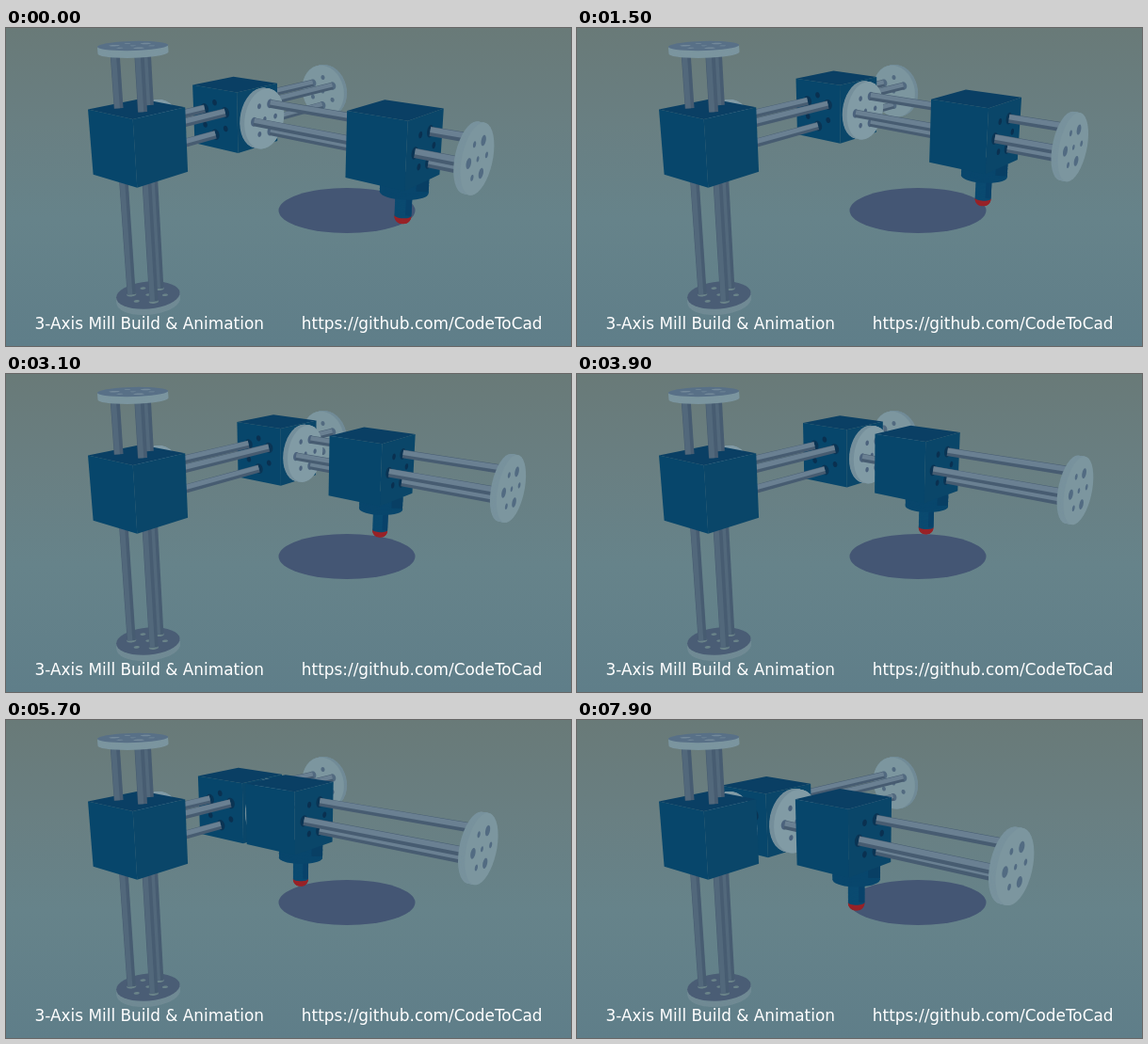
Animation of 600 by 338 pixels, one loop 8000 ms. Source, as an HTML page with a canvas:

```html
<!DOCTYPE html>
<html>
<head>
<meta charset="utf-8">
<style>
html, body { margin: 0; width: 100%; height: 100%; overflow: hidden; background: #67828a }
canvas { display: block }
</style>
</head>
<body>
<canvas width="600" height="338"></canvas>
<script>
const g = document.querySelector('canvas').getContext('2d');
const FOCAL = 833, RAD = Math.PI / 180, LIFT = 0.05, RING = 0.27;

// World axes seen from the camera: x right, y down, z away. Unit = one box side.
const yaw = 39 * RAD, pitch = 18.1 * RAD;
const [cy, sy, cp, sp] = [Math.cos(yaw), Math.sin(yaw), Math.cos(pitch), Math.sin(pitch)];
const AXES = [[cy, sy * sp, -sy * cp], [sy, -cy * sp, cy * cp], [0, -cp, -sp]];
const ORIGIN = [-2.237, -0.685, 11.7255];
const PLANE = [[1, 2], [0, 2], [0, 1]];
const ROD_ANGLES = [[60, 300, 180], [150, 270, 30], [97, 217, 337]];
const ROD_LIGHT = ['#6a8092', '#6a8092', '#52687b'];

const backdrop = g.createLinearGradient(0, 0, 0, 338);
[[0, '#697a78'], [0.3, '#697f82'], [0.6, '#66838a'], [1, '#5f7e89']]
  .forEach(s => backdrop.addColorStop(...s));

function project(p) {
  const [x, y, z] = ORIGIN.map((o, i) => o + p[0] * AXES[0][i] + p[1] * AXES[1][i] + p[2] * AXES[2][i]);
  return [300 + FOCAL * x / z, 169 + FOCAL * y / z, z];
}

function poly(points, color) {
  g.beginPath();
  points.forEach(p => g.lineTo(p[0], p[1]));
  g.fillStyle = color;
  g.fill();
}

// Point at polar offset (r, deg) around centre o, in the plane across the axis
function around(o, axis, r, deg, shift = 0) {
  const p = [...o], [u, v] = PLANE[axis];
  p[u] += r * Math.cos(deg * RAD);
  p[v] += r * Math.sin(deg * RAD);
  p[axis] += shift;
  return p;
}

function disc(o, axis, r, color, shift = 0) {
  const pts = [];
  for (let d = 0; d < 360; d += 10) pts.push(project(around(o, axis, r, d, shift)));
  poly(pts, color);
}

function cylinder(o, axis, r, depth, side, face) {
  for (let i = 10; i > 0; i--) disc(o, axis, r, side, depth * i / 10);
  disc(o, axis, r, face);
}

function plate(o, axis, face, rim, hole) {
  cylinder(o, axis, 0.5, axis === 1 ? 0.1 : -0.1, rim, face);
  for (const d of ROD_ANGLES[axis]) {
    disc(around(o, axis, RING, d), axis, 0.075, hole);
    disc(around(o, axis, RING, d + 60), axis, 0.045, hole);
  }
  disc(o, axis, 0.04, hole);
}

function strip(p, q, r, color, from = -1, to = 1) {
  const len = Math.hypot(q[0] - p[0], q[1] - p[1]) || 1;
  const nx = -(q[1] - p[1]) / len, ny = (q[0] - p[0]) / len;
  const edge = (e, k) => [e[0] + nx * k * r * FOCAL / e[2], e[1] + ny * k * r * FOCAL / e[2]];
  poly([edge(p, from), edge(q, from), edge(q, to), edge(p, to)], color);
}

function rods(o, axis, from, to) {
  if (to <= from) return;
  for (const d of ROD_ANGLES[axis]) {
    const p = project(around(o, axis, RING, d, from));
    const q = project(around(o, axis, RING, d, to));
    strip(p, q, 0.068, '#475c71');
    strip(p, q, 0.068, ROD_LIGHT[axis], -0.9, 0.25);
  }
}

function box([a, b, c], holeAxis) {
  const at = (i, j, k) => project([a + i / 2, b + j / 2, c + k / 2]);
  poly([at(-1, -1, 1), at(1, -1, 1), at(1, 1, 1), at(-1, 1, 1)], '#0a3f64');
  poly([at(1, -1, 1), at(1, 1, 1), at(1, 1, -1), at(1, -1, -1)], '#0a4669');
  poly([at(-1, -1, 1), at(1, -1, 1), at(1, -1, -1), at(-1, -1, -1)], '#07466b');
  if (holeAxis === undefined) return;
  const shift = holeAxis ? -0.5 : 0.5;
  for (const d of ROD_ANGLES[holeAxis]) {
    disc(around([a, b, c], holeAxis, RING, d + 60, shift), holeAxis, 0.05, '#0a3050');
    disc(around([a, b, c], holeAxis, RING, d, shift), holeAxis, 0.09, '#0a3454');
  }
}

function spindle([a, b]) {
  const low = h => [a + 0.12, b + 0.14, -h];
  // Rounded tip, then shaft, then collar, from the bottom up
  for (let k = 1; k >= 0; k -= 0.1) {
    disc(low(1.09 + 0.1 * k), 2, 0.127 * Math.sqrt(1 - 0.7 * k * k), '#982328');
  }
  for (let h = 1.08; h > 0.7; h -= 0.02) disc(low(h), 2, 0.127, '#0a4a70');
  strip(project(low(0.7)), project(low(1.08)), 0.127, '#08426a', -1, -0.3);
  cylinder(low(0.5), 2, 0.36, -0.21, '#08466c', '#08466c');
  strip(project(low(0.5)), project(low(0.69)), 0.36, '#083f64', -1, -0.5);
}

function draw(t) {
  const turn = 30.7 * RAD * (t - 2.96);
  const slide = 2.15 + 1.08 * Math.cos(turn);
  const reach = 2.1 - 1.03 * Math.sin(turn);

  g.fillStyle = backdrop;
  g.fillRect(0, 0, 600, 338);
  g.beginPath();
  g.ellipse(362, 194, 72.5, 24, 0, 0, 7);
  g.fillStyle = '#445674';
  g.fill();

  // Depth axis with its carriage
  const base = [0, 0, LIFT], carriage = [0, slide, LIFT];
  plate([0, 4.6, LIFT], 1, '#7c969f', '#718b97', '#526a80');
  rods(base, 1, slide + 0.5, 4.6);
  box(carriage, 1);
  rods(base, 1, 0.5, slide - 0.5);
  plate([0, 0.4, LIFT], 1, '#829ba6', '#829ba6', '#526a80');

  // Upright axis
  plate([0, 0, -2.53], 2, '#4a5d75', '#708a94', '#6a8389');
  rods([0, 0, 0], 2, -2.53, -0.5);
  box([0, 0, 0]);
  rods([0, 0, 0], 2, 0.5, 1.33);
  plate([0, 0, 1.42], 2, '#587087', '#7b959f', '#73899a');

  // Cross axis with the tool head
  const head = [reach, slide, LIFT];
  plate([0.65, slide, LIFT], 0, '#819ba5', '#758f9b', '#4c637d');
  rods(carriage, 0, 0.65, reach - 0.5);
  spindle(head);
  box(head, 0);
  rods(carriage, 0, reach + 0.5, 4.35);
  plate([4.45, slide, LIFT], 0, '#7c969f', '#78929d', '#526b82');

  g.fillStyle = '#fff';
  g.font = '16.9px "DejaVu Sans", sans-serif';
  g.fillText('3-Axis Mill Build & Animation', 30.6, 319.5);
  g.fillText('https://github.com/CodeToCad', 313.8, 319.5);
}

function tick() {
  draw(Math.floor(performance.now() % 8000 / 100) / 10);
  requestAnimationFrame(tick);
}
tick();
</script>
</body>
</html>
```
